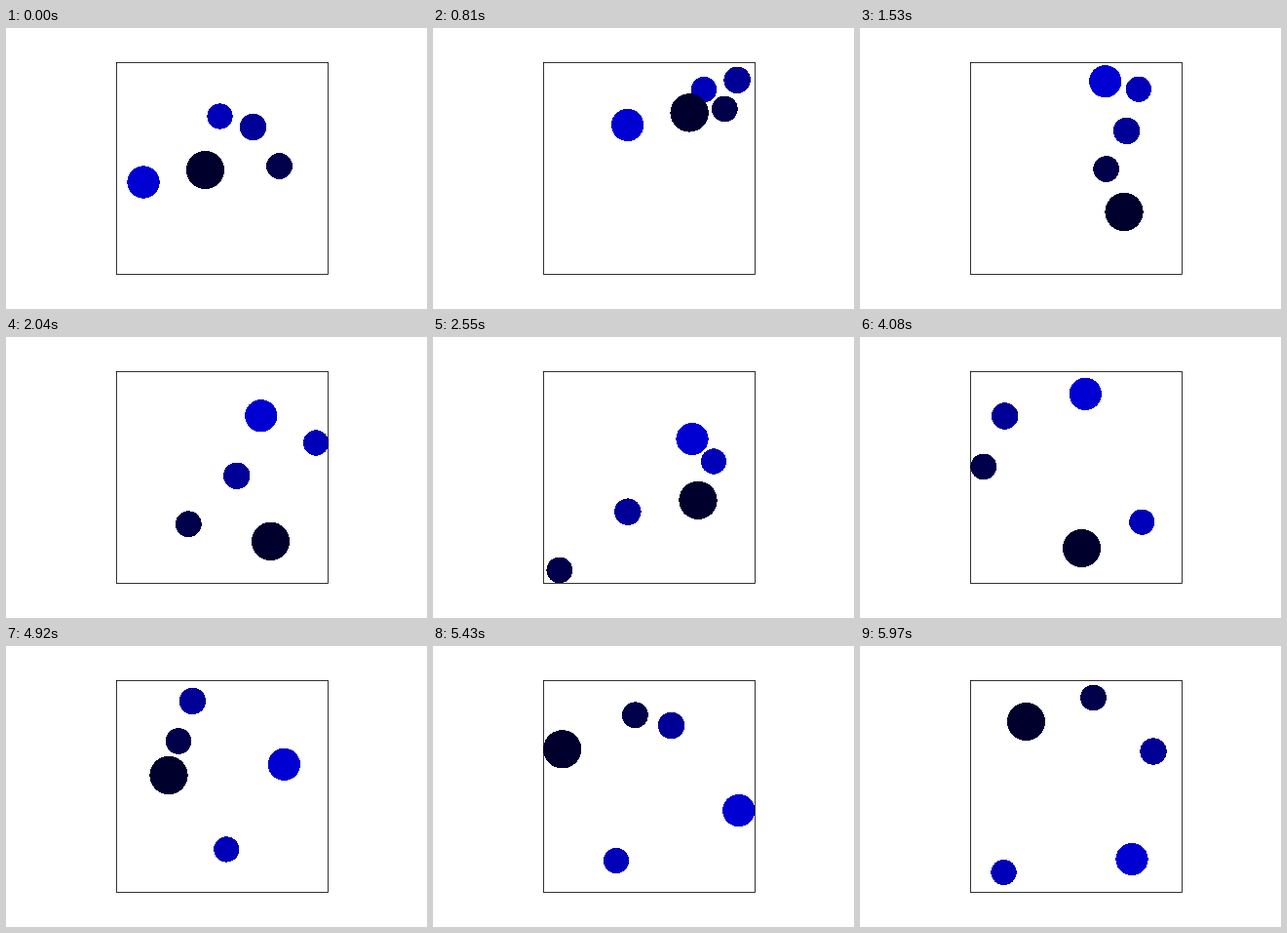
Animation of 432 by 288 pixels, one loop 6000 ms. Source, as an HTML page with a canvas:

```html
<!DOCTYPE html>
<html>
<head>
<meta charset="utf-8">
<style>
html, body { margin: 0; width: 100%; height: 100%; overflow: hidden; background: #fff; }
canvas { display: block; }
</style>
</head>
<body>
<canvas id="stage" width="432" height="288"></canvas>
<script>
const ctx = document.getElementById('stage').getContext('2d');
const LEFT = 113.5, TOP = 35.5, SIDE = 217, STEP = 30, STEPS = 200;
const SPEED = SIDE / 100; // per axis and step, until the first collision
const OVERSHOOT = 1.6;    // discs dip slightly past a wall before turning

// Every disc starts diagonally and flies freely until step `free`. Each later
// collision is { t, x, y }; a point beyond a wall is mirrored back by bounce().
const hit = (t, x, y) => ({ t, x, y });

function disc(r, blue, x, y, dx, free, ...hits) {
  const reach = free * SPEED;
  const path = [hit(0, x, y), hit(free, x + dx * reach, y - reach), ...hits];
  return { r, color: `rgb(0,0,${blue})`, path };
}

const discs = [
  disc(16.6, 210, 140.5, 157.5, 1, 54,
    hit(85, 265.5, 104), hit(125.5, 210.5, 87), hit(199, 352.5, -117)),
  disc(13.1, 185, 219, 90, 1, 27,
    hit(54, 286.4, 28), hit(79, 342, 141), hit(85, 287.5, 127),
    hit(115, 302, 175), hit(199, 491, 231.5)),
  disc(13.7, 150, 253, 101, 1, 94,
    hit(125.5, 181, 96), hit(199, -49.3, -12.3)),
  disc(13.4, 75, 280, 141, 1, 28,
    hit(94, 550.8, 263.4), hit(124, 126, 148), hit(144, 126.5, 122),
    hit(164, 176.5, 97), hit(199, 239, 42.1)),
  disc(19.6, 45, 204, 145, 1, 27,
    hit(51, 270.5, 188), hit(79, 271.3, 306.8), hit(115, 272.4, 190),
    hit(164, 166.5, 337), hit(199, 93, 77))
];

// Fold an unbounded coordinate into the range a disc of radius r can reach.
function bounce(p, start, r) {
  const lo = start + r - OVERSHOOT, span = SIDE - 2 * (r - OVERSHOOT);
  const q = (((p - lo) % (2 * span)) + 2 * span) % (2 * span);
  return lo + Math.min(q, 2 * span - q);
}

function place({ r, path }, step) {
  const i = path.findIndex(p => p.t >= step && p.t > 0);
  const a = path[i - 1], b = path[i];
  const k = (step - a.t) / (b.t - a.t);
  const along = (axis, start) => {
    const from = bounce(a[axis], start, r);
    return bounce(from + (b[axis] - from) * k, start, r);
  };
  return [along('x', LEFT), along('y', TOP)];
}

// Hard-edged disc, one pixel row at a time.
function fillDisc(x, y, r) {
  for (let row = Math.ceil(y - r); row <= y + r; row++) {
    const half = Math.sqrt(r * r - (row - y) ** 2);
    const from = Math.ceil(x - half), to = Math.floor(x + half);
    ctx.fillRect(from, row, to - from + 1, 1);
  }
}

function draw(now) {
  const step = Math.floor(now / STEP) % STEPS;
  ctx.fillStyle = '#fff';
  ctx.fillRect(0, 0, 432, 288);
  ctx.save();
  ctx.beginPath();
  ctx.rect(113, 35, 218, 218);
  ctx.clip();
  for (const d of discs) {
    ctx.fillStyle = d.color;
    fillDisc(...place(d, step), d.r);
  }
  ctx.restore();
  ctx.strokeStyle = '#000';
  ctx.lineWidth = 0.8;
  ctx.strokeRect(LEFT, TOP, SIDE, SIDE);
}

const begin = performance.now();
function tick() {
  draw(performance.now() - begin);
  requestAnimationFrame(tick);
}
tick();
</script>
</body>
</html>
```
